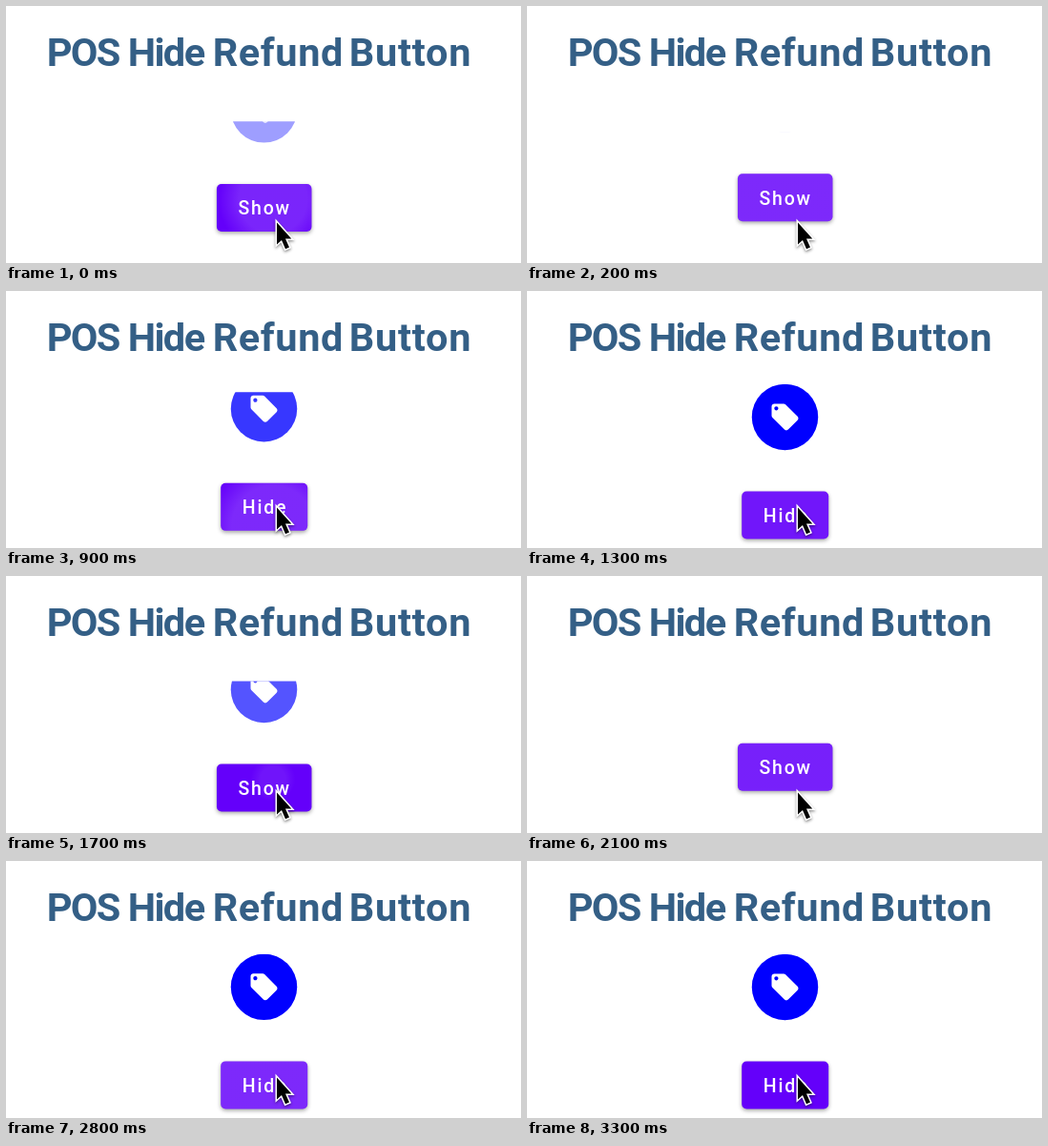
An HTML page with a canvas that plays this animation: 540 by 270 pixels, repeating every 3500 ms.

```html
<!DOCTYPE html>
<html lang="en">
<head>
<meta charset="utf-8">
<title>POS Hide Refund Button</title>
<style>
  html, body { margin: 0; width: 100%; height: 100%; overflow: hidden; background: #fff; }
  canvas { display: block; width: 540px; height: 270px; }
</style>
</head>
<body>
<canvas id="stage"></canvas>
<script>
const LOOP = 3500, TICK = 100, LAST = 3300;
const FONT = 'Roboto, "Open Sans", sans-serif';
const HALF = 34.75;          // half the badge height: how far the column travels
const CX = 270.5, BADGE_Y = 132.4, BUTTON_Y = 210.5, BUTTON_H = 50;

// Each click toggles the badge; py is where the press lands inside the button.
const CLICKS = [
  { at: -117, show: false, py: 16 },
  { at: 765, show: true, py: 46 },
  { at: 1635, show: false, py: 16 },
  { at: 2402, show: true, py: 46 }
];
const TITLE = [['POS', 42.7, -1.7], ['Hide', 127.7, -1.6], ['Refund', 216.7, 0.6], ['Button', 359.7, 0.8]];
const TAG = new Path2D('M21.41 11.58l-9-9C12.05 2.22 11.55 2 11 2H4c-1.1 0-2 .9-2 2v7c0 .55.22 1.05.59 1.42l9 9c.36.36.86.58 1.41.58.55 0 1.05-.22 1.41-.59l7-7c.37-.36.59-.86.59-1.41 0-.55-.23-1.06-.59-1.42zM5.5 7C4.67 7 4 6.33 4 5.5S4.67 4 5.5 4 7 4.67 7 5.5 6.33 7 5.5 7z');
const ARROW = new Path2D('M284 227.5V250.5L289 246L293 255.3L297 253.5L293 244.6H299.3Z');

const canvas = document.getElementById('stage');
const ctx = canvas.getContext('2d');
const dpr = window.devicePixelRatio || 1;
canvas.width = 540 * dpr;
canvas.height = 270 * dpr;

const clamp = v => Math.max(0, Math.min(1, v));

// Critically damped spring: the share of the way still to go.
function springRest(ms) {
  const wt = 0.02 * ms;
  return (1 + wt) * Math.exp(-wt);
}

function shadow(color, blur, dy) {
  ctx.shadowColor = color;
  ctx.shadowBlur = blur * dpr;
  ctx.shadowOffsetY = dy * dpr;
}

function text(str, x, y, font, color, spacing) {
  ctx.font = font + ' ' + FONT;
  ctx.letterSpacing = spacing + 'px';
  ctx.fillStyle = color;
  ctx.fillText(str, x, y);
}

function drawBadge(shift, alpha) {
  const top = BADGE_Y - HALF + shift;
  const height = 2 * (HALF - shift);
  if (height < 0.3) return;
  const tint = Math.round(255 * (1 - alpha));
  ctx.save();
  ctx.beginPath();
  ctx.rect(220, top, 101, height + 1);
  ctx.clip();
  ctx.translate(CX, BADGE_Y - shift);
  ctx.fillStyle = `rgb(${tint},${tint},255)`;
  ctx.beginPath();
  ctx.arc(0, 0, HALF, 0, 2 * Math.PI);
  ctx.fill();
  ctx.scale(1.4, 1.4);
  ctx.translate(-12, -12);
  ctx.fillStyle = '#fff';
  ctx.fill(TAG, 'evenodd');
  ctx.restore();
}

function drawRipple(x, y, age) {
  const solid = 2 + 70 * clamp((age - 40) / 160);
  const outer = solid * 1.5 + 4;
  const alpha = 0.16 * clamp(age / 130) * (1 - clamp((age - 400) / 300));
  const glow = ctx.createRadialGradient(x, y, solid, x, y, outer);
  glow.addColorStop(0, `rgba(255,255,255,${alpha})`);
  glow.addColorStop(1, 'rgba(255,255,255,0)');
  ctx.fillStyle = glow;
  ctx.fillRect(220, y - 60, 102, 120);
}

function drawButton(click, y, age) {
  const w = click.show ? 91 : 99.5;
  const x = CX + 0.2 - w / 2;
  const box = new Path2D();
  box.roundRect(x, y, w, BUTTON_H, 5);
  ctx.save();
  shadow('rgba(0,0,0,0.36)', 4, 1.8);
  ctx.fillStyle = '#6400fa';
  ctx.fill(box);
  ctx.restore();

  ctx.save();
  ctx.clip(box);
  drawRipple(280, y + click.py, age);
  ctx.restore();
  text(click.show ? 'Hide' : 'Show', x + 22.6, y + 32.3, '500 19.5px', '#fff', 1.74);
}

function drawCursor() {
  ctx.save();
  ctx.lineJoin = 'miter';
  ctx.lineWidth = 3;
  ctx.strokeStyle = '#fff';
  shadow('rgba(0,0,0,0.45)', 3, 1.5);
  ctx.stroke(ARROW);
  ctx.restore();
  ctx.fillStyle = '#000';
  ctx.fill(ARROW);
}

function draw(t) {
  const click = CLICKS.filter(c => c.at <= t).pop();
  const age = t - click.at;
  const rest = springRest(age);
  const hidden = click.show ? rest : 1 - rest;
  const shift = HALF * hidden;

  ctx.setTransform(dpr, 0, 0, dpr, 0, 0);
  ctx.fillStyle = '#fff';
  ctx.fillRect(0, 0, 540, 270);
  for (const [word, x, gap] of TITLE) text(word, x, 63, '700 41.5px', '#345f86', gap);
  drawBadge(shift, Math.pow(1 - hidden, 0.85));
  drawButton(click, BUTTON_Y - shift, age);
  drawCursor();
}

const start = performance.now();
function frame() {
  const t = (performance.now() - start) % LOOP;
  draw(Math.min(LAST, Math.floor(t / TICK) * TICK));
  requestAnimationFrame(frame);
}
frame();
</script>
</body>
</html>
```
